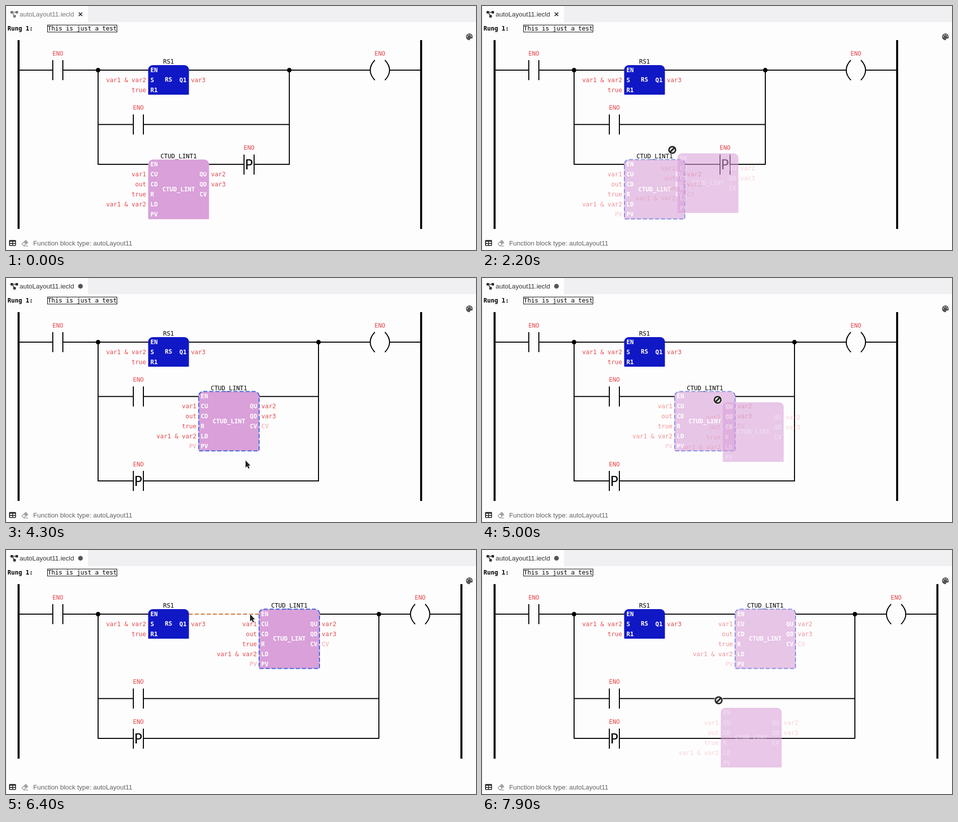
Recreate the animation shown at these times as an HTML page with a canvas. Size 934 by 487 pixels, loop 8 s.

```html
<!DOCTYPE html>
<html lang="en">
<head>
<meta charset="utf-8">
<title>Ladder diagram editor</title>
<style>
  html, body { margin: 0; width: 100%; height: 100%; overflow: hidden; background: #fefdfe; }
  canvas { display: block; }
</style>
</head>
<body>
<canvas id="stage" width="934" height="487"></canvas>
<script>
const ctx = document.getElementById('stage').getContext('2d');
const LOOP = 8000, STEP = 100;
const MONO = '12px "DejaVu Sans Mono", monospace';
const BOLD = 'bold ' + MONO;
const UI = '13px "Liberation Sans", Arial, sans-serif';
const RED = '#e5484a', PAPER = '#fefdfe', INK = '#000', ORANGE = '#cf7236';

const RS = {
  w: 80, h: 58.5, type: 'RS', name: 'RS1', color: '#1018c6',
  left: [['EN'], ['S', 'var1 & var2'], ['R1', 'true']],
  right: [[], ['Q1', 'var3']]
};
const COUNTER = {
  w: 120, h: 118.5, type: 'CTUD_LINT', name: 'CTUD_LINT1', color: '#d9a0d9',
  left: [['EN'], ['CU', 'var1'], ['CD', 'out'], ['R', 'true'], ['LD', 'var1 & var2'], ['PV']],
  right: [[], ['QU', 'var2'], ['QD', 'var3'], ['CV']]
};
const CONTACT_H = 30;

// When the counter is picked up and dropped, and over which wire
const SELECT = 1600;
const DRAGS = [
  { from: 1700, over: 2500, to: 3500 },
  { from: 4800, over: 5700, to: 6400 },
  { from: 7400, over: LOOP, to: LOOP }
];
// Pointer moves: begin, end, destination
const ENTRY = [600, 22];
const MOVES = [
  [300, 800, 470, 250], [900, 1400, 341, 424], [1650, 2800, 392, 236],
  [3400, 4300, 476, 364], [4400, 4800, 460, 300], [4800, 5900, 485, 128],
  [6800, 7100, 555, 188], [7200, 7700, 543, 235], [7700, 8300, 412, 352]
];
const LEAD = 20;  // the dragged image runs slightly ahead of the cursor icon

const easeOut = f => 1 - (1 - f) ** 2;
const clamp01 = f => Math.min(1, Math.max(0, f));

function pointerAt(t) {
  return MOVES.reduce(([x, y], [begin, end, tx, ty]) => {
    const f = easeOut(clamp01((t - begin) / (end - begin)));
    return [x + (tx - x) * f, y + (ty - y) * f];
  }, ENTRY);
}

// The counter moves up one row with each drop; everything else follows from it
function layoutAt(t) {
  const drops = DRAGS.filter(d => t >= d.to).length;
  const home = 2 - drops;
  const x = [503, 383, 283][home];
  const heights = [RS.h, CONTACT_H, CONTACT_H];
  heights[home] = COUNTER.h;
  const rows = [128];
  for (let i = 0; i < 2; i++) rows.push(rows[i] + heights[i] + 50);
  const join = x + COUNTER.w + (home === 2 ? 160 : 118);
  const coilX = Math.max(743, join + 82);
  const pulseX = home === 2 ? x + 200 : 263;
  return { home, x, rows, join, coilX, pulseX, rail: coilX + 82, bottom: rows[2] + heights[2] + 10 };
}

function text(s, x, y, { font = MONO, color = INK, align = 'left', alpha = 1 } = {}) {
  ctx.save();
  Object.assign(ctx, { font, fillStyle: color, textAlign: align, globalAlpha: alpha });
  ctx.fillText(s, x, y);
  ctx.restore();
}

function line(points, { width = 2, color = INK, dash = [] } = {}) {
  ctx.beginPath();
  for (let i = 0; i < points.length; i += 2) ctx.lineTo(points[i], points[i + 1]);
  Object.assign(ctx, { lineWidth: width, strokeStyle: color });
  ctx.setLineDash(dash);
  ctx.stroke();
  ctx.setLineDash([]);
}

function disc(x, y, r, color) {
  ctx.fillStyle = color;
  ctx.beginPath();
  ctx.arc(x, y, r, 0, 7);
  ctx.fill();
}

function rect(x, y, w, h, color, radius = 0) {
  ctx.fillStyle = color;
  ctx.beginPath();
  ctx.roundRect(x, y, w, h, radius);
  ctx.fill();
}

// Horizontal wire broken by elements; one segment may be a drop target
function wire(y, start, end, gaps, hot) {
  const xs = [start, ...gaps.flat(), end];
  for (let i = 0; i < xs.length; i += 2) {
    line([xs[i], y, xs[i + 1], y], i / 2 === hot ? { color: ORANGE, dash: [8, 4] } : {});
  }
}

function caption(x, y) {
  text('ENO', x, Math.floor(y - 29), { color: RED, align: 'center' });
}

function contact(x, y, letter) {
  for (const dx of [-10, 10]) line([x + dx, y - 20, x + dx, y + 20]);
  if (letter) text(letter, x, y + 9.5, { font: MONO.replace('12', '27'), align: 'center' });
  caption(x, y);
}

function coil(x, y) {
  for (const s of [-1, 1]) {
    ctx.beginPath();
    ctx.moveTo(x + 10 * s, y - 20);
    ctx.quadraticCurveTo(x + 28.5 * s, y, x + 10 * s, y + 20);
    ctx.lineWidth = 2;
    ctx.strokeStyle = INK;
    ctx.stroke();
  }
  caption(x, y);
}

function block(b, x, y, { selected, alpha = 1, pinAlpha = 1, labelAlpha = alpha, named = true } = {}) {
  ctx.save();
  ctx.globalAlpha = alpha;
  rect(x - 0.5, y - 10, b.w + 1, b.h + 0.5, b.color, [9, 9, 1, 1]);
  if (selected) {
    ctx.beginPath();
    ctx.roundRect(x, y - 10, b.w, b.h, [9, 9, 1, 1]);
    Object.assign(ctx, { lineWidth: 2, strokeStyle: '#4066dc' });
    ctx.setLineDash([8, 4]);
    ctx.stroke();
  }
  ctx.restore();
  const pinStyle = { font: BOLD, color: '#fff', alpha: pinAlpha };
  const side = (pins, pinX, labelX, pinAlign, labelAlign) => pins.forEach(([pin, label], i) => {
    if (!pin) return;
    const ty = Math.floor(y + 4 + 20 * i);
    text(pin, pinX, ty, { ...pinStyle, align: pinAlign });
    const labelStyle = { color: RED, align: labelAlign, alpha: labelAlpha };
    if (label) text(label, labelX, ty, labelStyle);
    else if (selected && i) text(pin, labelX, ty, { ...labelStyle, alpha: labelAlpha / 2 });
  });
  side(b.left, x + 4, x - 4.5, 'left', 'right');
  side(b.right, x + b.w - 4, x + b.w + 4.5, 'right', 'left');
  text(b.type, x + b.w / 2, Math.floor(y + b.h / 2 - 5.5), { ...pinStyle, align: 'center' });
  if (named) text(b.name, x + b.w / 2, Math.round(y - 13), { align: 'center' });
}

function tab(active, dirty) {
  rect(0, 0, 934, 32, '#f0eff2');
  rect(0, 0, 163, 32, PAPER);
  rect(0, 0, 1, 487, '#e9e8ea');
  const color = active ? '#333' : '#777';
  line([21, 12.5, 12, 12.5, 17, 20], { width: 1.5, color });
  for (const [x, y] of [[9, 10], [19, 10], [14.5, 18]]) rect(x, y, 5, 5, color);
  text('autoLayout11.iecld', 27, 21, { font: UI, color });
  if (dirty) disc(148, 16.5, 4.7, '#555');
  else for (const s of [-3.5, 3.5]) line([148 - s, 13, 148 + s, 20], { width: 1.7, color: '#222' });
}

function paletteIcon(x, y) {
  disc(x, y, 6.7, '#555');
  for (let i = 0; i < 4; i++) {
    const a = Math.PI * (1.06 + i * 0.29);
    disc(x + 4.2 * Math.cos(a), y + 4.2 * Math.sin(a), 1, PAPER);
  }
  disc(x + 4, y + 6, 2.8, PAPER);
}

function statusBar() {
  rect(6, 467, 14, 12, '#333', 2);
  for (const x of [8, 14]) for (const y of [470.5, 474.8]) rect(x, y, 4.3, 2.5, PAPER);
  const color = '#a2a2a2';
  ctx.save();
  ctx.translate(37.5, 473.3);
  ctx.rotate(-Math.PI / 4.4);
  rect(-6, -3.7, 12, 7.4, color, 1);
  rect(-4.5, -2.2, 4, 4.4, PAPER);
  ctx.restore();
  line([35, 479, 44, 479], { width: 1.4, color });
  text('Function block type: autoLayout11', 54, 478, { font: UI, color: '#616161' });
}

function rungTitle() {
  text('Rung 1:', 3, 49, { font: BOLD });
  text('This is just a test', 83, 49);
  ctx.lineWidth = 1;
  ctx.strokeStyle = INK;
  ctx.strokeRect(82.5, 38, 138, 14);
}

function shape(path, x, y, fill, edge, width) {
  ctx.save();
  ctx.translate(x, y);
  const p = new Path2D(path);
  Object.assign(ctx, { fillStyle: fill, strokeStyle: edge, lineWidth: width, lineJoin: 'round' });
  ctx.stroke(p);
  ctx.fill(p);
  ctx.restore();
}

const cursors = {
  arrow: (x, y) => shape('M0 0V14.5L3.2 11.6 5.6 16.6 8 15.5 5.6 10.6H9.8Z', x, y, '#222', '#fff', 1.6),
  hand: (x, y) => shape('M0 1.5Q1.5-1 3 1.5L4 6 10 7.5Q12 8 12 10L11 15H4L-2.5 9.5Q-2.5 7.5 0 8L1.5 9Z',
    x - 1, y, '#fff', '#222', 2.4),
  blocked(x, y) {
    disc(x, y, 8.8, '#fff');
    disc(x, y, 8, '#222');
    disc(x, y, 5.2, '#ddd');
    line([x - 4.5, y + 4.5, x + 4.5, y - 4.5], { width: 3, color: '#222' });
  }
};

function draw(t) {
  const { home, x: bx, rows, join, coilX, pulseX, rail, bottom } = layoutAt(t);
  const [top, mid, low] = rows;
  const corner = Math.floor(low);
  const drag = DRAGS.find(d => t >= d.from && t < d.to);
  const dropReady = drag && t >= drag.over;
  const hotMid = dropReady && drag === DRAGS[0];
  const hotTop = t >= DRAGS[1].over && t < 6900;
  const gaps = (r, ...list) =>
    (home === r ? [...list, [bx, bx + COUNTER.w]] : list).sort((a, b) => a[0] - b[0]);

  rect(0, 0, 934, 487, PAPER);
  tab(t >= SELECT, t >= DRAGS[0].to);
  rungTitle();
  paletteIcon(920.8, 61.5);
  statusBar();

  for (const x of [25, rail]) line([x, 68, x, bottom], { width: 4 });
  wire(top, 25, rail, gaps(0, [93, 113], [283, 363], [join, join], [coilX - 19, coilX + 19]), hotTop ? 2 : -1);
  wire(mid, 183, join, gaps(1, [253, 273]), hotMid ? 1 : -1);
  wire(corner, 183, join, gaps(2, [pulseX - 10, pulseX + 10]));
  for (const x of [183, join]) {
    line([x, top, x, corner + 1]);
    disc(x, top, 4.5, INK);
  }
  contact(103, top);
  contact(263, mid);
  contact(pulseX, low, 'P');
  coil(coilX, top);
  block(RS, 283, top);
  block(COUNTER, bx, rows[home], { selected: t >= SELECT, alpha: drag ? 0.6 : 1 });

  if (t < 400) return;
  if (drag) {
    const [gx, gy] = pointerAt(t + LEAD).map(Math.round);
    block(COUNTER, gx + 10, gy + 20, { alpha: 0.58, pinAlpha: 0.35, labelAlpha: 0.24, named: false });
  }
  cursors[!drag ? 'arrow' : dropReady ? 'hand' : 'blocked'](...pointerAt(t));
}

const start = performance.now();
function tick() {
  const t = (performance.now() - start) % LOOP;
  draw(Math.floor(t / STEP) * STEP);
  requestAnimationFrame(tick);
}
tick();
</script>
</body>
</html>
```
